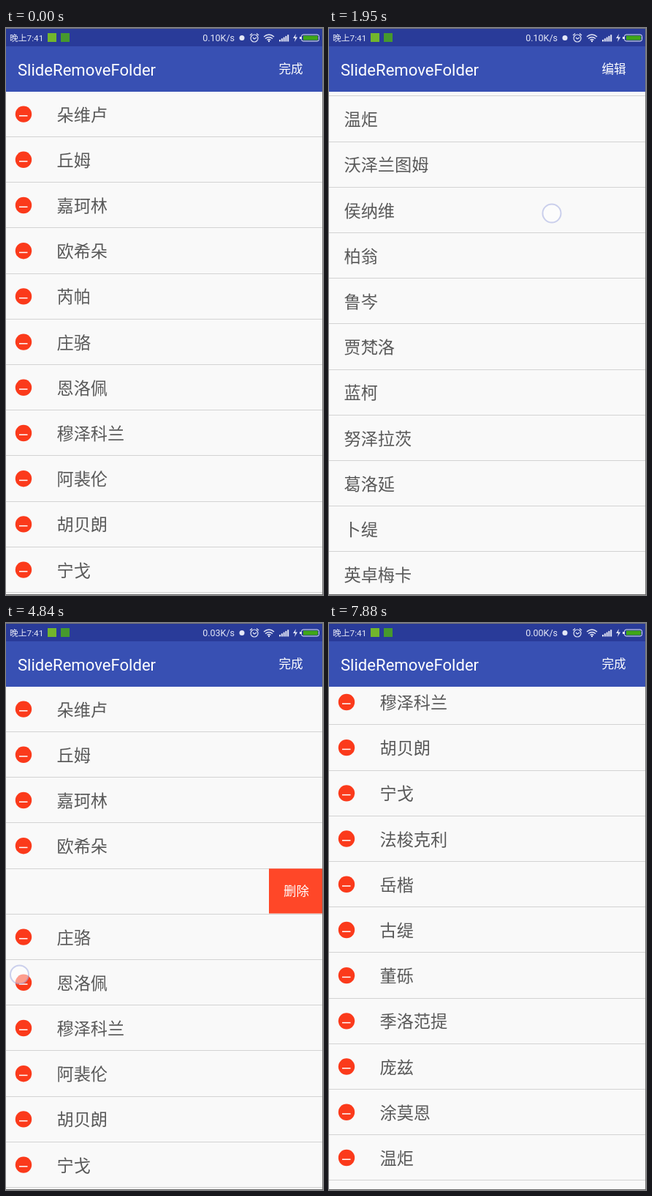
An HTML page with a canvas that plays this animation: 434x774 px, repeating every 8000 ms.

```html
<!DOCTYPE html>
<html lang="zh-CN">
<head>
<meta charset="utf-8">
<title>Swipe list</title>
<style>
html, body { margin: 0; height: 100%; overflow: hidden; background: #f9f9f9; }
canvas { display: block; }
</style>
</head>
<body>
<canvas id="stage" width="434" height="774"></canvas>
<script>
const ctx = document.getElementById('stage').getContext('2d');
const W = 434, H = 774, BAR = 25, TOP = 87, LIST_TOP = 86.5, ROW = 62.2, LOOP = 8000;
const EDIT_WIDTH = 49, BUTTON_WIDTH = 74;
const TAP = 160, SLIDE = 310, REST = 100, DRAG = 180, FLING = 400;
const ICON = '#e4e7f6';
const CJK = '"Noto Sans CJK SC", "Noto Sans CJK", sans-serif';
const LATIN = 'Roboto, "Noto Sans CJK SC", sans-serif';
const names = ('朵维卢 丘姆 嘉珂林 欧希朵 芮帕 庄骆 恩洛佩 穆泽科兰 阿裴伦 胡贝朗 宁戈 法梭克利 岳楷 古缇 董砾 ' +
  '季洛范提 庞兹 涂莫恩 温炬 沃泽兰图姆 侯纳维 柏翁 鲁岑 贾梵洛 蓝柯 努泽拉茨 葛洛延 卜缇 英卓梅卡').split(' ');

// The script of the demo: when each gesture begins
const exitEdit = 1260, enterEdit = 3050, openRow = 3950, closeRow = 4790;
const swipes = [
  { at: 220, x: 272, y: 650, dy: -200, distance: 1023 },
  { at: 498, x: 272, y: 608, dy: -90, distance: 90 },
  { at: 2040, x: 305, y: 253, dy: 227, distance: -1113 },
  { at: 7560, x: 36, y: 640, dy: -165, distance: 464 }
];
const deletions = [{ row: 6, slot: 6, at: 5630 }, { row: 8, slot: 7, at: 6560 }];

const linear = p => p;
const easeOut = p => 1 - (1 - p) ** 3;
const smooth = p => p * p * (3 - 2 * p);
const ramp = (t, start, length, ease = easeOut) => ease(Math.min(1, Math.max(0, (t - start) / length)));

const slotY = slot => LIST_TOP + (slot + .5) * ROW;
const tap = (at, x, y) => ({ at, start: at, end: at + TAP, x, y, dy: 0 });
const touches = [
  ...swipes.map(s => ({ ...s, start: s.at - REST, end: s.at + DRAG })),
  tap(exitEdit, 390, 57), tap(enterEdit, 390, 57),
  tap(openRow, 22, slotY(4)), tap(closeRow, 18.5, 480),
  ...deletions.flatMap(d => [tap(d.at, 22, slotY(d.slot)), tap(d.at + TAP + SLIDE, 404, slotY(d.slot))])
];

// A swipe follows the finger, then coasts over the remaining distance
const scrollAt = t => swipes.reduce((sum, { at, dy, distance }) =>
  sum - dy * ramp(t, at, DRAG, linear) + (distance + dy) * ramp(t, at + DRAG, FLING), 0);

const slideAfterTap = (t, at) => ramp(t, at + TAP, SLIDE);
const editShift = t => EDIT_WIDTH * (slideAfterTap(t, enterEdit) - slideAfterTap(t, exitEdit));

function rowState(row, t) {
  const deletion = deletions.find(d => d.row === row);
  if (deletion) {
    const confirmed = deletion.at + 2 * TAP + SLIDE;
    return {
      open: slideAfterTap(t, deletion.at),
      fade: ramp(t, confirmed, 120, linear),
      collapse: ramp(t, confirmed + 120, 200, smooth)
    };
  }
  const open = row === 4 ? slideAfterTap(t, openRow) - slideAfterTap(t, closeRow) : 0;
  return { open, fade: 0, collapse: 0 };
}

function rect(x, y, w, h, color) {
  ctx.fillStyle = color;
  ctx.fillRect(x, y, w, h);
}

function disc(x, y, r, color) {
  ctx.fillStyle = color;
  ctx.beginPath();
  ctx.arc(x, y, r, 0, 7);
  ctx.fill();
}

function text(str, x, y, size, color, family = CJK, align = 'left') {
  ctx.font = `${size}px ${family}`;
  ctx.fillStyle = color;
  ctx.textAlign = align;
  ctx.fillText(str, x, y);
}

function strokePath(d, width = 1.2) {
  ctx.strokeStyle = ICON;
  ctx.lineWidth = width;
  ctx.stroke(new Path2D(d));
}

function drawRow(name, y, shift, alpha) {
  ctx.globalAlpha = alpha;
  const middle = y + ROW / 2;
  disc(24 + shift, middle, 11.2, '#fb3a1b');
  rect(18 + shift, middle + 1.5, 11.5, 1.5, '#fff');
  text(name, 69.5 + shift, middle + 9, 23.2, '#595959');
  const buttonX = W + EDIT_WIDTH + shift;
  if (buttonX < W) {
    rect(buttonX, y, BUTTON_WIDTH, ROW - 1, '#ff4728');
    text('删除', buttonX + 20, middle + 6, 17.4, '#fff');
  }
  ctx.globalAlpha = 1;
}

function drawList(t) {
  const shift = editShift(t);
  let y = LIST_TOP - scrollAt(t);
  names.forEach((name, i) => {
    const { open, fade, collapse } = rowState(i, t);
    if (y > -ROW && y < H && fade < 1) {
      drawRow(name, y, shift - (EDIT_WIDTH + BUTTON_WIDTH) * open, 1 - fade);
    }
    y += ROW * (1 - collapse);
    rect(0, Math.round(y - .7), W, 1, '#d3d3d3');
  });
}

function drawStatusBar(t) {
  rect(0, 0, W, BAR, '#293b99');
  text('晚上7:41', 5, 18, 11.8, ICON, LATIN);
  rect(57, 7, 12, 12, '#72b62c');
  rect(75, 7, 12, 12, '#46992d');
  const speed = t < 2310 ? '0.10' : t < 5630 ? '0.03' : '0.00';
  text(speed + 'K/s', 313, 18, 12.5, ICON, LATIN, 'right');
  disc(323, 13.5, 3.5, ICON);
  strokePath('M345 14a5 5 0 1 0-10 0a5 5 0 1 0 10 0M338 13l2 2l3-2M334 10l3-2.5M346 10l-3-2.5');
  strokePath('M353 12q7-6 14 0M355 14.5q5-4 10 0M357.5 16.5q2.5-2 5 0', 1.5);
  disc(360, 18, 1.2, ICON);
  for (let i = 0; i < 5; i++) rect(374 + i * 2.8, 16 - i * 1.7, 2, 2.5 + i * 1.7, ICON);
  ctx.fill(new Path2D('M397 8l-4 6h3l-1 5l4-6.5h-3z'));
  strokePath('M407 9h19q2.5 0 2.5 2.5v4q0 2.5-2.5 2.5h-19q-2.5 0-2.5-2.5v-4q0-2.5 2.5-2.5z', 1);
  rect(402, 12, 2, 3, ICON);
  rect(407, 10.5, 20, 6, '#3fa617');
}

function drawToolbar(t) {
  rect(0, BAR, W, TOP - BAR, '#3850b3');
  text('SlideRemoveFolder', 16, 65, 22.1, '#fff', LATIN);
  const editing = t < exitEdit + TAP || t >= enterEdit + TAP;
  text(editing ? '完成' : '编辑', 373.5, 62.3, 16.6, '#fff');
}

function drawTouch({ at, x, y, dy }, t) {
  const fingerY = y + dy * ramp(t, at, DRAG, linear);
  disc(x, fingerY, 12, 'rgba(255,255,255,.5)');
  ctx.beginPath();
  ctx.arc(x, fingerY, 12.5, 0, 7);
  ctx.strokeStyle = 'rgba(170,178,226,.6)';
  ctx.lineWidth = 2;
  ctx.stroke();
}

function draw(now) {
  const t = now % LOOP;
  rect(0, 0, W, H, '#f9f9f9');
  drawList(t);
  drawStatusBar(t);
  drawToolbar(t);
  touches.filter(touch => t >= touch.start && t < touch.end).forEach(touch => drawTouch(touch, t));
  rect(0, 0, W, 1, '#777');
  rect(W - 1, 0, 1, H, '#777');
  rect(0, H - 1, W, 1, '#666');
  requestAnimationFrame(draw);
}
requestAnimationFrame(draw);
</script>
</body>
</html>
```
